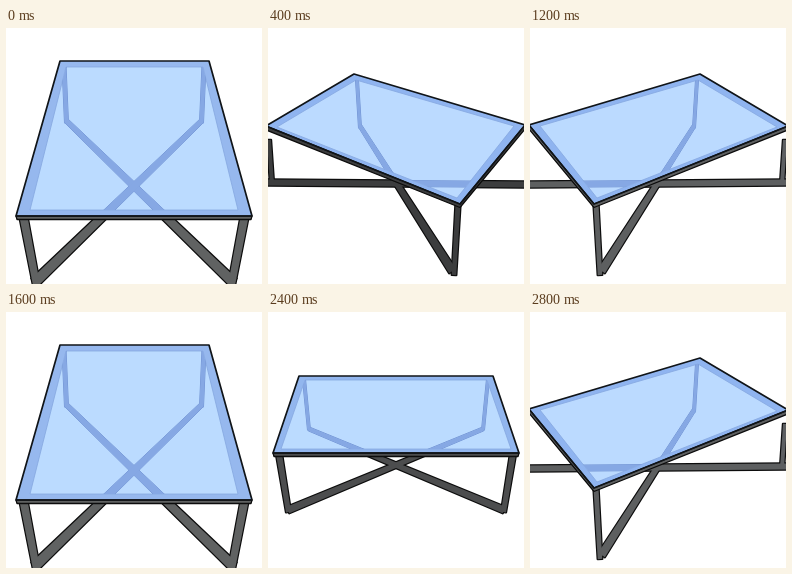
Recreate the animation shown at these times as an HTML page with a canvas. Size 256x256 px, loop 3.2 s.

```html
<!DOCTYPE html>
<html lang="en">
<head>
<meta charset="utf-8">
<title>Turning glass table</title>
<style>
  html, body { margin: 0; width: 100%; height: 100%; overflow: hidden; background: #fff; }
  canvas { display: block; }
</style>
</head>
<body>
<canvas id="stage" width="256" height="256"></canvas>
<script>
const SIZE = 256;
const STEP = 400;
const ctx = document.getElementById('stage').getContext('2d');

// A beam is [x1, y1, width1, x2, y2, width2].
const flip = ([x1, y1, w1, x2, y2, w2]) => [SIZE - x1, y1, w1, SIZE - x2, y2, w2];
const withMirror = beams => beams.concat(beams.map(flip));

const endView = {
  outer: [[54, 33], [203, 33], [246, 188], [10, 188]],
  inner: [[60, 39], [197, 39], [232, 182], [24, 182]],
  rim: [[10, 188], [246, 188], [245, 191.5], [11, 191.5]],
  beams: withMirror([
    [58, 37, 4, 60.5, 95, 4],
    [60.5, 93, 5, 227, 254, 10],
    [17.5, 189, 8, 30.5, 257, 7]
  ]),
  metal: '#606262', glass: '#bbdbff', band: '#96b8ee'
};

const cornerView = {
  outer: [[86, 46], [257, 97], [192, 176], [-2, 98]],
  inner: [[88, 52], [246, 98], [189, 170], [9, 99]],
  rim: [[-2, 98], [192, 176], [257, 97], [257, 101], [192, 179.5], [-2, 102]],
  beams: [
    [89, 52, 3, 92, 100, 3],
    [92, 98, 4, 184.5, 243, 8],
    [1, 112, 4, 4, 156, 4],
    [-4, 154.5, 6, 262, 156.5, 6],
    [190, 176, 5, 186, 247, 4.5]
  ],
  metal: '#3c3d3e', glass: '#bbdaff', band: '#8fb4f0'
};

const sideView = {
  outer: [[31, 64], [225, 64], [251, 141], [5, 141]],
  inner: [[37, 68], [219, 68], [243, 137], [13, 137]],
  rim: [[5, 141], [251, 141], [250, 144.5], [6, 144.5]],
  beams: withMirror([
    [36, 67, 3, 41, 118, 3],
    [41, 117, 4, 236, 198, 7],
    [11, 142, 6, 20.5, 200, 5]
  ]),
  metal: '#4c4d4e', glass: '#bbdbff', band: '#92b6ee'
};

const views = [
  endView,
  cornerView,
  sideView,
  { ...cornerView, metal: '#5d5f60', mirrored: true }
];

function trace(points) {
  ctx.beginPath();
  points.forEach(([x, y]) => ctx.lineTo(x, y));
  ctx.closePath();
}

function shape(points, fill, stroke, width) {
  trace(points);
  if (fill) {
    ctx.fillStyle = fill;
    ctx.fill();
  }
  if (stroke) {
    ctx.strokeStyle = stroke;
    ctx.lineWidth = width;
    ctx.stroke();
  }
}

function beamShape([x1, y1, w1, x2, y2, w2]) {
  const len = Math.hypot(x2 - x1, y2 - y1);
  const nx = (y1 - y2) / len / 2, ny = (x2 - x1) / len / 2;
  return [
    [x1 + nx * w1, y1 + ny * w1], [x2 + nx * w2, y2 + ny * w2],
    [x2 - nx * w2, y2 - ny * w2], [x1 - nx * w1, y1 - ny * w1]
  ];
}

// Edges go first so that the joints stay clean.
function drawBeams(beams, fill, edge, width) {
  const shapes = beams.map(beamShape);
  shapes.forEach(s => shape(s, null, edge, width));
  shapes.forEach(s => shape(s, fill));
}

function drawTable(view) {
  ctx.save();
  ctx.lineJoin = 'round';
  if (view.mirrored) {
    ctx.translate(SIZE, 0);
    ctx.scale(-1, 1);
  }
  drawBeams(view.beams, view.metal, '#0c0c0c', 2.4);
  shape(view.outer, view.band);
  shape(view.inner, view.glass, '#86a8e0', 0.8);

  // The frame as seen through the glass
  ctx.save();
  trace(view.inner);
  ctx.clip();
  drawBeams(view.beams, '#86a8e4', '#7092d2', 1);
  ctx.restore();

  shape(view.rim, view.metal, '#0c0c0c', 1.3);
  shape(view.outer, null, '#101418', 1.7);
  ctx.restore();
}

function draw() {
  const step = Math.floor(performance.now() / STEP) % views.length;
  ctx.fillStyle = '#fff';
  ctx.fillRect(0, 0, SIZE, SIZE);
  drawTable(views[step]);
  requestAnimationFrame(draw);
}
draw();
</script>
</body>
</html>
```
